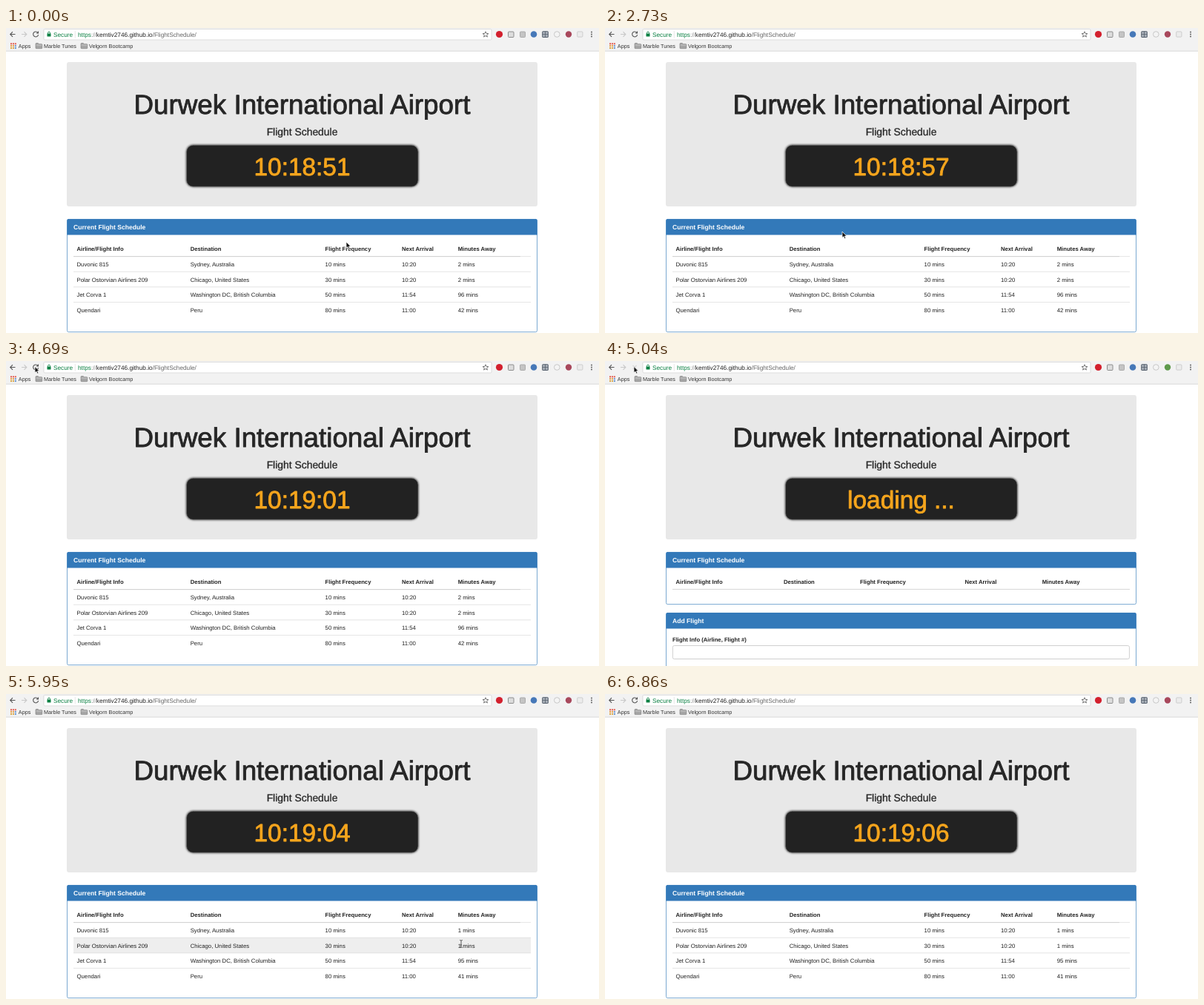
Recreate the animation shown at these times as an HTML page. Size 800 by 412 pixels, loop 7000 ms.

```html
<!DOCTYPE html>
<html lang="en">
<head>
<meta charset="utf-8">
<title>Flight Schedule</title>
<style>
  html, body { margin: 0; width: 100%; height: 100%; overflow: hidden; background: #fff; }
  svg { display: block; width: 800px; height: 412px; }
  text { font-family: "Liberation Sans", Arial, sans-serif; font-size: 7.78px; fill: #222; text-rendering: geometricPrecision; white-space: pre; }
  .mid { text-anchor: middle; stroke-linejoin: round; }
  .title { font-size: 36.8px; fill: #262626; stroke: #262626; stroke-width: .85px; }
  .subtitle { font-size: 13.9px; fill: #262626; stroke: #262626; stroke-width: .3px; }
  .clock { font-size: 33.4px; fill: #f5a51d; stroke: #f5a51d; stroke-width: .85px; }
  .bold { font-weight: bold; font-size: 7.68px; }
  .heading { font-weight: bold; font-size: 8.6px; fill: #fff; }
  .url { font-size: 8.27px; }
  .mark { font-size: 7.25px; fill: #333; }
  .line { stroke: #ddd; stroke-width: .8; }
  .icon { fill: none; stroke: #555; stroke-width: 1.1; }
</style>
</head>
<body>
<svg viewBox="0 0 800 412">
  <defs>
    <filter id="blur" x="-5%" y="-20%" width="110%" height="140%"><feGaussianBlur stdDeviation=".8"/></filter>
    <g id="folder"><path d="M0 1q0-1 1-1h2.3l1 1.2H8q.8 0 .8.8v4.4q0 .8-.8.8H.8Q0 7.2 0 6.4z" fill="#a5a5a5" stroke="#777" stroke-width=".6"/><path d="M.5 2.6h7.8" stroke="#ddd" stroke-width=".6"/></g>
  </defs>

  <rect width="800" height="31" fill="#f2f2f2"/>
  <path d="M0 31.2H800" stroke="#c8c8c8" stroke-width=".7"/>
  <rect x="51" y="1.5" width="604" height="14.5" rx="1.5" fill="#fff" stroke="#d0d0d0" stroke-width=".7"/>
  <path class="icon" d="M12.5 8.5H5.8M9 5.2L5.7 8.5L9 11.8"/>
  <path class="icon" d="M21 8.5h6.7M24.5 5.2l3.3 3.3l-3.3 3.3" style="stroke:#c8c8c8"/>
  <path id="reload" class="icon" d="M43 6.4a3.5 3.5 0 1 0 .6 2.8M43.5 4.5v2.5h-2.5"/>
  <path id="stop" class="icon" d="M37.5 6l5 5m0-5l-5 5" style="stroke:#d5d5d5"/>
  <rect x="55.5" y="7.5" width="5" height="4" rx=".5" fill="#0b8043"/>
  <path class="icon" d="M56.5 8V6.7a1.500 1.500 0 0 1 3 0V8" style="stroke:#0b8043;stroke-width:.9"/>
  <text class="url" x="64" y="11.7" style="fill:#0b8043">Secure</text>
  <path d="M93.3 4v9.500" stroke="#ddd" stroke-width=".7"/>
  <text class="url" x="97" y="11.7"><tspan fill="#0b8043">https</tspan><tspan fill="#888">://</tspan>kemtiv2746.github.io<tspan fill="#666">/FlightSchedule/</tspan></text>
  <path class="icon" d="M647 4.8l1.1 2.6 2.8.2-2.2 1.800.7 2.700-2.400-1.500-2.400 1.500.7-2.700-2.200-1.800 2.800-.2z" style="stroke-width:.8"/>
  <circle cx="665.5" cy="8.5" r="4.6" fill="#d3202e"/>
  <rect x="677.5" y="5" width="7.5" height="7.5" rx="1" fill="#ddd" stroke="#8c8c8c"/>
  <rect x="693.5" y="5" width="7" height="7.5" rx="1" fill="#c4c4c4" stroke="#aaa"/>
  <circle cx="712" cy="8.5" r="4.3" fill="#4678b8"/>
  <rect x="723.7" y="4.7" width="7.6" height="7.8" rx=".5" fill="#a9b0b9" stroke="#56606d"/>
  <path d="M723.7 8.6h7.6M727.5 4.7v7.8" stroke="#56606d" stroke-width=".8"/>
  <circle cx="743.3" cy="8.5" r="3.8" fill="#f4f4f4" stroke="#bbb" stroke-width=".8"/>
  <circle id="badge" cx="759" cy="8.5" r="4.2"/>
  <rect x="770.7" y="4.9" width="7.200" height="7.200" rx="1" fill="#ececec" stroke="#c4c4c4" stroke-width=".8"/>
  <g fill="#555"><circle cx="790" cy="5.5" r=".9"/><circle cx="790" cy="8.5" r=".9"/><circle cx="790" cy="11.5" r=".9"/></g>
  <g id="apps"></g>
  <text class="mark" x="16.8" y="26.6">Apps</text>
  <use href="#folder" x="40" y="20.5"/>
  <text class="mark" x="51" y="26.6">Marble Tunes</text>
  <use href="#folder" x="101" y="20.5"/>
  <text class="mark" x="112" y="26.6">Velgorn Bootcamp</text>

  <rect x="82" y="46" width="635" height="195" rx="3" fill="#e8e8e8"/>
  <text class="mid title" x="399.5" y="116.2">Durwek International Airport</text>
  <text class="mid subtitle" x="399.5" y="145.2">Flight Schedule</text>
  <rect x="242.5" y="157.3" width="314.500" height="58" rx="10" fill="#666" filter="url(#blur)"/>
  <rect x="243.5" y="158.300" width="312.500" height="56" rx="9" fill="#222" stroke="#8a8a8a" stroke-width=".5"/>
  <text id="clock" class="mid clock" x="399.5" y="198.9"></text>

  <g id="full"></g>
  <g id="empty"></g>

  <path id="arrow" d="M0 0V8.300L1.900 6.600L3.200 9.600L4.700 9L3.400 6.100H6z" fill="#111" stroke="#fff" stroke-width=".7"/>
  <path id="beam" d="M-1.800-4.500Q0-4.500 0-3.500Q0-4.500 1.800-4.500M0-3.500V4.500M-1.800 5.500Q0 5.500 0 4.500Q0 5.500 1.800 5.500M-1 2H1" fill="none" stroke="#333" stroke-width=".8"/>
</svg>
<script>
const LOOP = 7000, STEP = 70, SECOND = 481;
const CLICK = 4760, LOADING = 4830, LOADED = 5250;
const $ = id => document.getElementById(id);

const headers = ["Airline/Flight Info", "Destination", "Flight Frequency", "Next Arrival", "Minutes Away"];
const columns = [95.5, 248.7, 430.6, 534, 609.7];
const emptyColumns = [95.5, 241, 344, 485.5, 589.7];
const flights = [
  ["Duvonic 815", "Sydney, Australia", 10, "10:20", 2],
  ["Polar Ostorvian Airlines 209", "Chicago, United States", 30, "10:20", 2],
  ["Jet Corva 1", "Washington DC, British Columbia", 50, "11:54", 96],
  ["Quendari", "Peru", 80, "11:00", 42]
];
const rowTop = i => 308.6 + i * 20.6;

const text = (x, y, str, cls = "") => `<text x="${x}" y="${y}" class="${cls}">${str}</text>`;
const line = (y, right, color) => `<path class="line" d="M91 ${y}H${right}" style="stroke:${color}"/>`;
const panel = (y, height, title) =>
  `<rect x="82.5" y="${y + .4}" width="634" height="${height - .8}" rx="2" fill="#fff" stroke="#5a93c6" stroke-width=".8"/>
   <path d="M82.3 ${y + 21.5}V${y + 2}q0-2 2-2H714.7q2 0 2 2V${y + 21.5}z" fill="#3379b9"/>` +
  text(91, y + 14.3, title, "heading");
const headerRow = xs => headers.map((h, i) => text(xs[i], 300.9, h, "bold")).join("");

$("apps").innerHTML = ["#e2574c", "#e59a3c", "#d9a441"].map((c, row) =>
  [0, 1, 2].map(col => `<rect x="${6 + col * 2.9}" y="${20.3 + row * 2.9}" width="2" height="2" fill="${col === 2 && row ? "#5f8fd0" : c}"/>`).join("")).join("");

$("full").innerHTML = panel(258, 153, "Current Flight Schedule") + headerRow(columns) +
  flights.map(([name, place, every, next], i) => {
    const y = rowTop(i), base = y + 13.3;
    return `<rect class="row" x="91" y="${y}" width="617" height="20.6" fill="#eee"/>` +
      line(y, 708, "#ddd") + (i ? "" : line(y, 694, "#ccc")) +
      [name, place, every + " mins", next].map((s, c) => text(columns[c], base, s)).join("") +
      text(columns[4], base, "", "away");
  }).join("");

$("empty").innerHTML = panel(258, 71, "Current Flight Schedule") + headerRow(emptyColumns) + line(308.4, 708, "#ccc") +
  panel(340, 100, "Add Flight") + text(91, 378.5, "Flight Info (Airline, Flight #)", "bold") +
  `<rect x="91.4" y="384.5" width="616" height="18" rx="2" fill="#fff" stroke="#c4c4c4" stroke-width=".8"/>`;

const rows = document.querySelectorAll(".row"), away = document.querySelectorAll(".away");

// time, x, y of the pointer
const path = [
  [0, 459, 289], [1050, 335, 279], [1190, 332, 278], [1540, 320, 275], [3710, 320, 275],
  [3990, 199, 113], [4480, 40, 10], [4690, 39, 7.5], [5110, 39, 7.5], [5600, 400, 185],
  [5950, 614, 337], [6300, 630, 327.5], [6790, 788, 405], [6860, 810, 425], [LOOP, 810, 425]
];
// left, top, right, bottom of areas that show the text pointer
const textAreas = [[172, 84, 627, 122], [351, 133, 448, 149], [335, 172, 464, 204], [608, 332, 636, 346]];

function pointerAt(t) {
  const i = path.findIndex(p => p[0] > t), [t0, x0, y0] = path[i - 1], [t1, x1, y1] = path[i];
  const k = (t - t0) / (t1 - t0);
  return [x0 + (x1 - x0) * k, y0 + (y1 - y0) * k];
}

function clockAt(t) {
  const started = LOADING + SECOND;
  if (t >= LOADING && t < started) return "loading ...";
  const s = t < LOADING ? 55 + Math.floor((t - 1620) / SECOND) : 63 + Math.floor((t - started) / SECOND);
  return `10:${18 + Math.floor(s / 60)}:${String(s % 60).padStart(2, "0")}`;
}

const show = (el, on) => el.style.display = on ? "" : "none";

function draw(now) {
  const t = Math.floor(now % LOOP / STEP) * STEP;
  const loading = t >= LOADING && t < LOADED, busy = t >= CLICK && t < LOADED;
  const [x, y] = pointerAt(t);
  const beam = textAreas.some(([l, top, r, b]) => x >= l && x <= r && y >= top && y <= b);

  $("clock").textContent = clockAt(t);
  show($("full"), !loading);
  show($("empty"), loading);
  show($("reload"), !busy);
  show($("stop"), busy);
  $("badge").setAttribute("fill", loading ? "#5f9a4c" : "#a8485c");
  rows.forEach((row, i) => show(row, x > 91 && x < 708 && y >= rowTop(i) && y < rowTop(i + 1)));
  away.forEach((cell, i) => cell.textContent = `${flights[i][4] - (t >= LOADED ? 1 : 0)} mins`);
  show($("arrow"), !beam);
  show($("beam"), beam);
  for (const id of ["arrow", "beam"]) $(id).setAttribute("transform", `translate(${x} ${y})`);
}

const start = performance.now();
function tick() {
  draw(performance.now() - start);
  requestAnimationFrame(tick);
}
tick();
</script>
</body>
</html>
```
